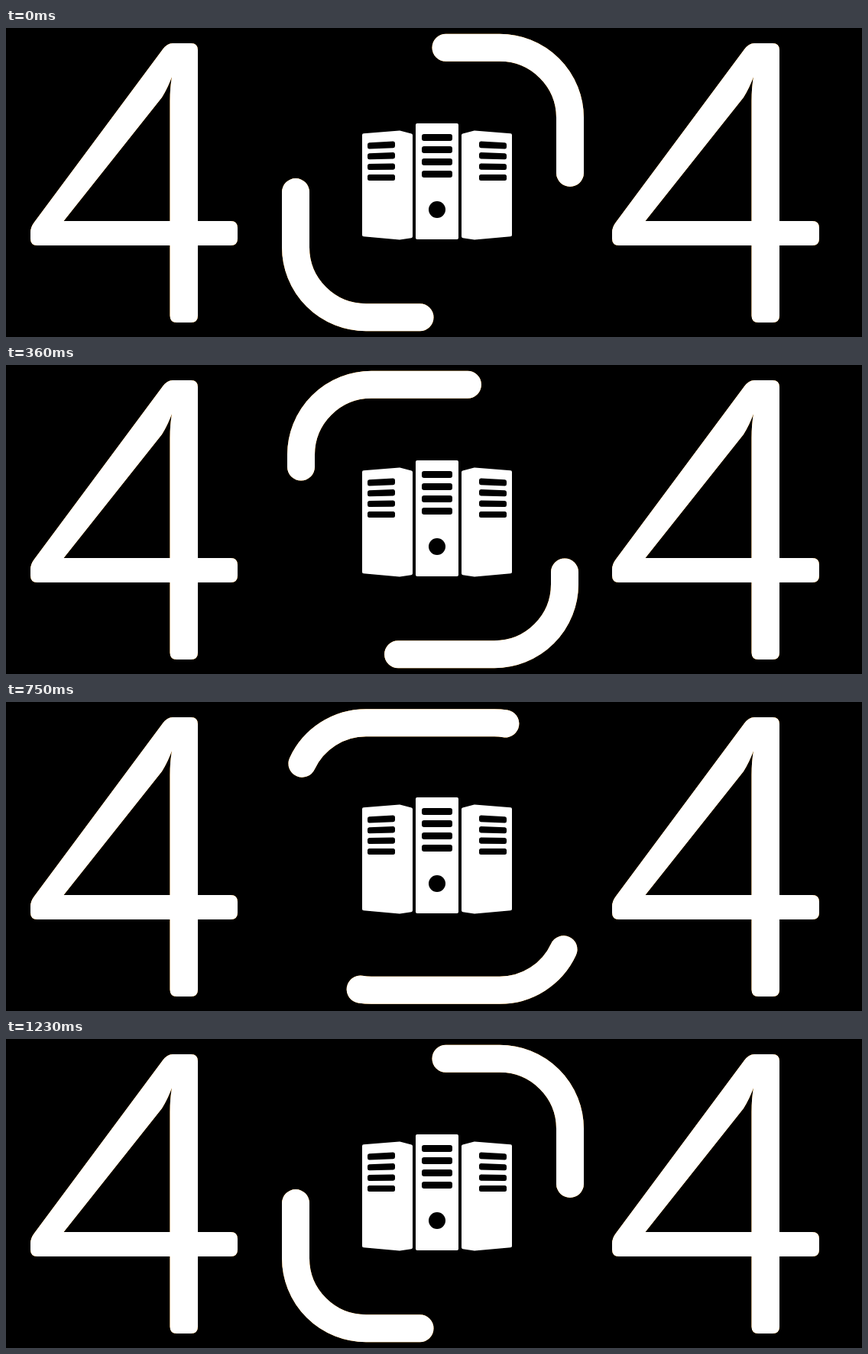
Recreate the animation shown at these times as an HTML page with a canvas. Size 1120 px wide and 405 px high, loop 1.8 s.

```html
<!DOCTYPE html>
<html lang="en">
<head>
<meta charset="utf-8">
<title>404</title>
<style>
html, body { margin: 0; width: 100%; height: 100%; overflow: hidden; background: #000; }
canvas { display: block; }
</style>
</head>
<body>
<canvas id="stage" width="1120" height="405"></canvas>
<script>
const ctx = document.getElementById('stage').getContext('2d');

const LOOP = 1800, TURN = 1230, STEP = 30;
const SIZE = 352, RADIUS = 92, DASH = 287;
const PERIMETER = 4 * (SIZE - 2 * RADIUS) + 2 * Math.PI * RADIUS;

// White over orange leaves a thin warm rim on soft edges
const LAYERS = ['#f90', '#fff'];

const FOUR = new Path2D(
  'M218 20H242Q251 20 251 29V253H294Q303 253 303 262V276Q303 285 294 285H251V377' +
  'Q251 386 242 386H223.5Q214.5 386 214.5 377V285H41Q32 285 32 276V268Q32 261 37 254.5' +
  'L205 28Q211 20 218 20Z' +
  'M75.500 253H214.5V96Q214.500 78 217 64Q211.500 79 204 91Z');

// Polygon with every corner rounded by r
function poly(points, r, color) {
  const n = points.length;
  const [ax, ay] = points[n - 1], [bx, by] = points[0];
  ctx.beginPath();
  ctx.moveTo((ax + bx) / 2, (ay + by) / 2);
  points.forEach(([x, y], i) => ctx.arcTo(x, y, ...points[(i + 1) % n], r));
  ctx.closePath();
  ctx.fillStyle = color;
  ctx.fill();
}

function box(x, y, w, h, r, color) {
  poly([[x, y], [x + w, y], [x + w, y + h], [x, y + h]], r, color);
}

function drawFour(x) {
  ctx.save();
  ctx.translate(x, 0);
  for (const color of LAYERS) {
    ctx.fillStyle = color;
    ctx.fill(FOUR, 'evenodd');
  }
  ctx.restore();
}

function sideServer(mirrored) {
  ctx.save();
  if (mirrored) {
    ctx.translate(1128, 0);
    ctx.scale(-1, 1);
  }
  poly([[466, 138.5], [515, 134.5], [532, 139], [532, 275], [515, 277.5], [466, 273]], 2, '#fff');
  for (let i = 0; i < 4; i++) {
    const y = 150.5 + i * 13.8, rise = (3 - i) * 0.7;
    poly([[473, y], [509, y - rise], [509, y + 8 - rise * 0.6], [473, y + 8]], 2.5, '#000');
  }
  ctx.restore();
}

function servers() {
  sideServer(false);
  sideServer(true);
  box(536, 125, 56, 152, 2, '#fff');
  for (let i = 0; i < 4; i++) box(544, 139 + i * 16, 40, 9, 3, '#000');
  ctx.beginPath();
  ctx.arc(564, 238, 11, 0, 2 * Math.PI);
  ctx.fill();
}

// One dash on a rounded square; the path starts on the top side and runs clockwise
function arm(x, y, shift) {
  const right = x + SIZE, bottom = y + SIZE, start = x + 189.5;
  ctx.beginPath();
  ctx.moveTo(start, y);
  ctx.arcTo(right, y, right, bottom, RADIUS);
  ctx.arcTo(right, bottom, x, bottom, RADIUS);
  ctx.arcTo(x, bottom, x, y, RADIUS);
  ctx.arcTo(x, y, right, y, RADIUS);
  ctx.lineTo(start, y);
  ctx.lineDashOffset = shift;
  for (const color of LAYERS) {
    ctx.strokeStyle = color;
    ctx.stroke();
  }
}

function ring(progress) {
  const shift = progress * PERIMETER;
  ctx.save();
  ctx.lineWidth = 36;
  ctx.lineCap = 'round';
  ctx.setLineDash([DASH, PERIMETER - DASH]);
  arm(386, 25.75, shift);
  // The second arm is the first one turned by half a circle
  ctx.translate(1117, 405);
  ctx.rotate(Math.PI);
  arm(386, 25.75, shift);
  ctx.restore();
}

function draw(ms) {
  const t = Math.floor((ms % LOOP) / STEP) * STEP;
  const p = Math.min(t / TURN, 1);
  ctx.fillStyle = '#000';
  ctx.fillRect(0, 0, 1120, 405);
  drawFour(0);
  drawFour(761);
  servers();
  ring(p < 1 ? p * p * (3 - 2 * p) : 0);
}

const begin = performance.now();
function tick() {
  draw(performance.now() - begin);
  requestAnimationFrame(tick);
}
tick();
</script>
</body>
</html>
```
